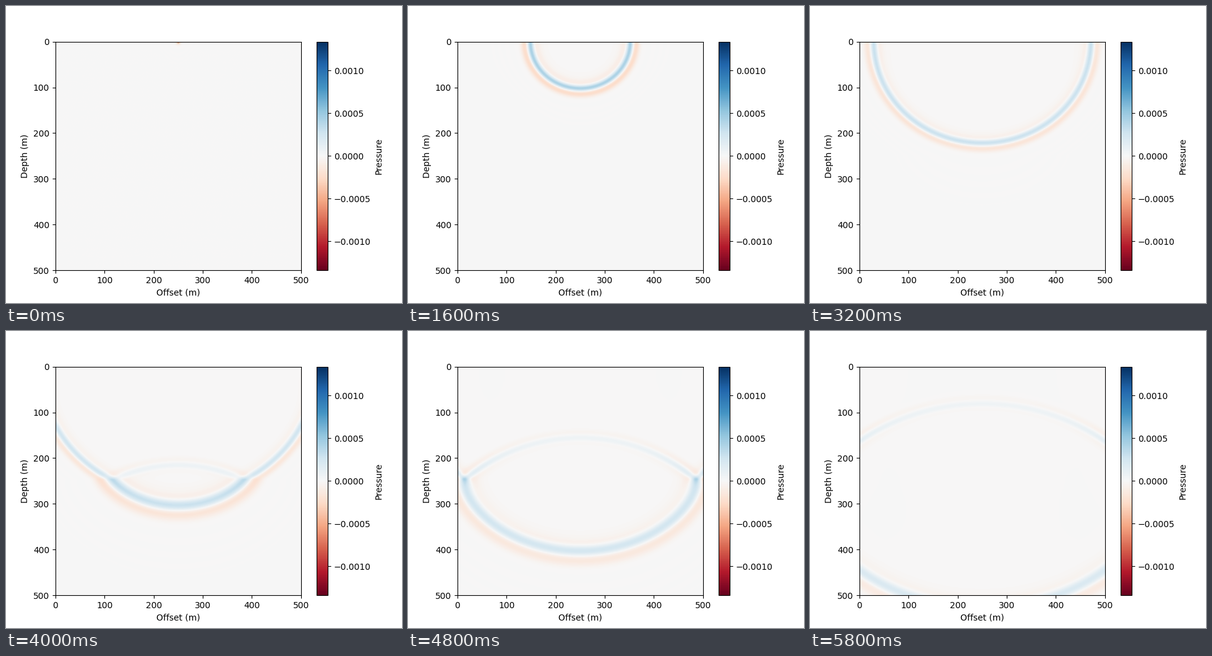
A matplotlib script for the animation above (6000 ms loop, 640x480 px).

```python
import numpy as np
import matplotlib.pyplot as plt
from matplotlib.animation import FuncAnimation

FRAMES, INTERVAL = 30, 200
SIZE, DX, PAD = 500.0, 2.5, 60      # metres, metres, cells of absorbing border
DT, STEPS = 0.25e-3, 40             # seconds, time steps per frame
V_TOP, V_BOTTOM, INTERFACE = 1500.0, 2500.0, 250.0
FREQ, DELAY = 50.0, 0.02
VMAX = 0.00134


def ricker(t):
    a = (np.pi * FREQ * (t - DELAY)) ** 2
    return (1 - 2 * a) * np.exp(-a)


def laplacian(u, out):
    """Fourth-order five-point stencil per axis, in units of DX."""
    c = u[2:-2, 2:-2]
    near = u[1:-3, 2:-2] + u[3:-1, 2:-2] + u[2:-2, 1:-3] + u[2:-2, 3:-1]
    far = u[:-4, 2:-2] + u[4:, 2:-2] + u[2:-2, :-4] + u[2:-2, 4:]
    out[2:-2, 2:-2] = (16 * near - far - 60 * c) / 12
    return out


def simulate():
    n = int(SIZE / DX) + 1
    total = n + 2 * PAD
    cell = np.arange(total) - PAD
    speed = np.where(cell * DX >= INTERFACE, V_BOTTOM, V_TOP)[:, None]
    courant = (speed * DT / DX) ** 2

    depth = np.maximum(np.maximum(-cell, cell - (n - 1)), 0)
    taper = np.exp(-(0.003 * depth) ** 2)
    sponge = np.outer(taper, taper)

    src = (PAD, PAD + n // 2)
    view = slice(PAD, PAD + n)
    prev, cur, lap = (np.zeros((total, total)) for _ in range(3))
    shots = []
    for step in range(1, FRAMES * STEPS + 1):
        new = 2 * cur - prev + courant * laplacian(cur, lap)
        new[src] += courant[PAD, 0] * ricker(step * DT)
        prev, cur = cur * sponge, new * sponge
        if step % STEPS == 0:
            shots.append(cur[view, view].copy())
    shots = np.array(shots)
    return shots * (0.32 * VMAX / shots[8][:, n // 2].max())


waves = simulate()

fig, ax = plt.subplots(figsize=(6.4, 4.8), dpi=100)
image = ax.imshow(waves[0], cmap="RdBu", vmin=-VMAX, vmax=VMAX,
                  extent=[0, SIZE, SIZE, 0], aspect="auto")
ax.set_xlabel("Offset (m)")
ax.set_ylabel("Depth (m)")
fig.colorbar(image, ax=ax, label="Pressure")


def update(i):
    image.set_data(waves[i])
    return [image]


anim = FuncAnimation(fig, update, frames=FRAMES, interval=INTERVAL,
                     repeat=True, repeat_delay=0)
plt.show()
```
